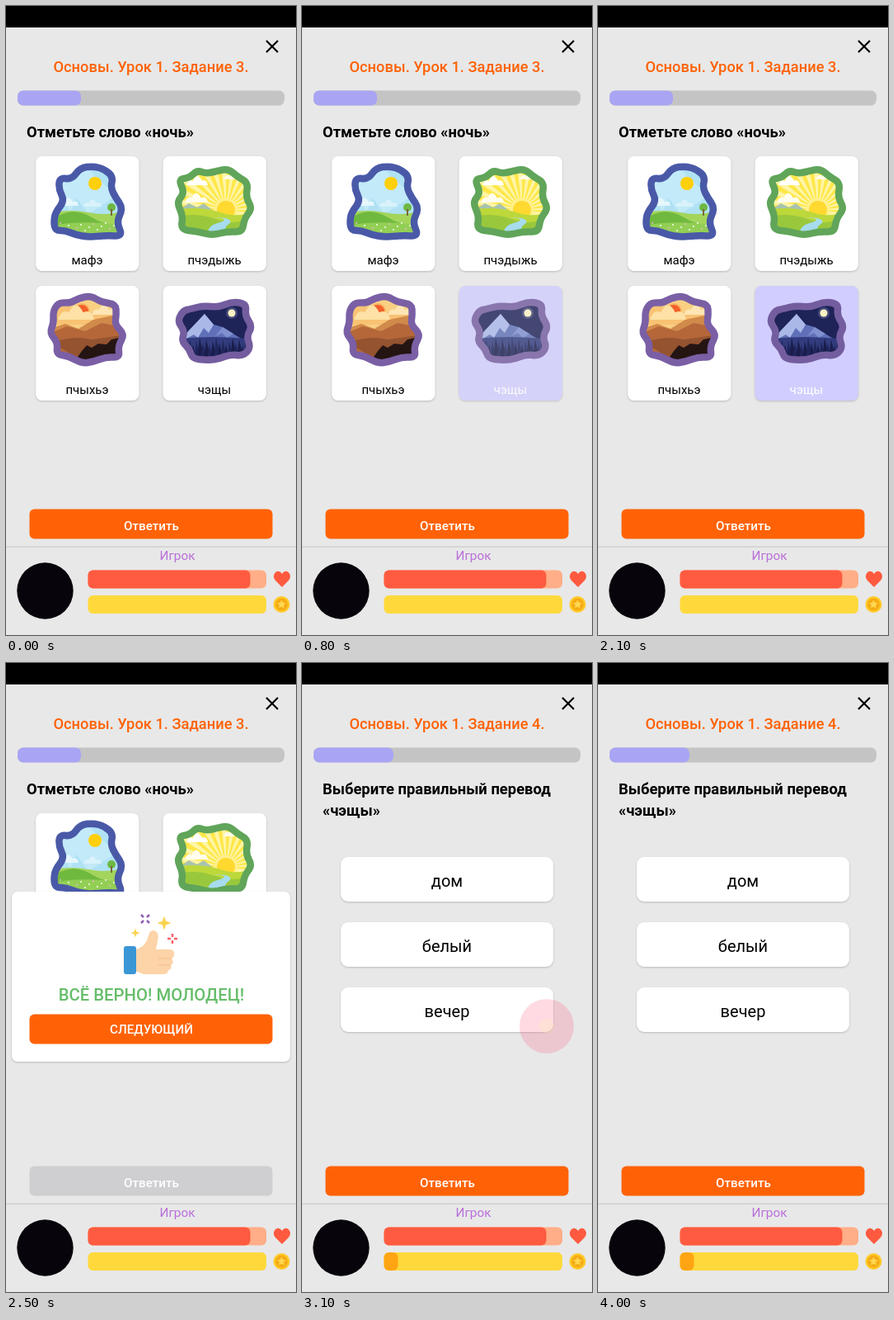
Write an HTML page that moves like this. It is 352x762 px and loops after 4100 ms.

```html
<!DOCTYPE html>
<html lang="ru">
<head>
<meta charset="utf-8">
<style>
html, body { margin: 0; width: 100%; height: 100%; overflow: hidden; background: #e8e8e8; }
svg { display: block; }
text { font-family: Roboto, "Noto Sans", sans-serif; text-anchor: middle; }
.bold { font-weight: 700; text-anchor: start; }
.medium { font-weight: 500; }
.raised { filter: drop-shadow(0 1px 1px #0003); }
</style>
</head>
<body>
<svg id="stage" width="352" height="762" viewBox="0 0 352 762"></svg>
<script>
const ORANGE = '#ff6206', LAVENDER = '#d1ceff', LOOP = 4100;

const rect = (x, y, w, h, r, fill, more = '') =>
  `<rect x="${x}" y="${y}" width="${w}" height="${h}" rx="${r}" fill="${fill}" ${more}/>`;
const circle = (x, y, r, fill, more = '') =>
  `<circle cx="${x}" cy="${y}" r="${r}" fill="${fill}" ${more}/>`;
const path = (d, fill, more = '') => `<path d="${d}" fill="${fill}" ${more}/>`;
const text = (x, y, size, str, fill = '#000', more = '') =>
  `<text x="${x}" y="${y}" font-size="${size}" fill="${fill}" ${more}>${str}</text>`;
const repeat = (n, make) => Array.from({ length: n }, (_, i) => make(i)).join('');

// Closed smooth outline through the midpoints of the given corners
function blob(corners) {
  const p = corners.split(' ').map(s => s.split(',').map(Number));
  const mid = i => {
    const a = p[i % p.length], b = p[(i + 1) % p.length];
    return `${(a[0] + b[0]) / 2} ${(a[1] + b[1]) / 2}`;
  };
  return `M${mid(0)}` + repeat(p.length, i => `Q${p[(i + 1) % p.length].join(' ')} ${mid(i + 1)}`) + 'Z';
}

function star(x, y, r, points, inner, fill) {
  const corner = i => {
    const a = i * Math.PI / points - Math.PI / 2, d = i % 2 ? r * inner : r;
    return `${i ? 'L' : 'M'}${x + d * Math.cos(a)} ${y + d * Math.sin(a)}`;
  };
  return path(repeat(points * 2, corner) + 'Z', fill);
}

const cloud = (x, y, s, fill) =>
  path(`M${x} ${y}q${s * .1} ${-s * .3} ${s * .3} ${-s * .2}q${s * .2} ${-s * .4} ${s * .4} 0q${s * .25} ${-s * .1} ${s * .3} ${s * .2}Z`, fill);

const dayScene = rect(52, 190, 96, 95, 0, '#b0e2f5')
  + path('M60 215L100 194L78 250ZM98 196L134 230L100 252L84 230Z', '#c2eaf8')
  + circle(108, 215, 8, '#ffcf0a')
  + cloud(64, 242, 24, '#e6f6fc') + cloud(94, 243, 22, '#d9f2fb')
  + path('M52 252Q75 245 100 250T148 247V285H52Z', '#a3d55d')
  + circle(128, 244, 5, '#6fb843') + rect(127, 246, 2, 8, 0, '#7b6a3a')
  + path('M52 262Q78 240 104 256T148 258V285H52Z', '#70b93f')
  + path('M52 267Q90 258 148 266V285H52Z', '#93cf55')
  + repeat(15, i => circle(66 + i * 5, 263 + i * 7 % 11, .9, i % 4 ? '#fff' : '#f4b6d0'));

const dawnScene = rect(205, 192, 98, 92, 0, '#fff5a6')
  + repeat(15, i => {
    const a = Math.PI + i * .225, b = a + .11;
    const end = v => `${267 + 75 * Math.cos(v)} ${247 + 75 * Math.sin(v)}`;
    return path(`M267 247L${end(a)}L${end(b)}Z`, '#ffe748');
  })
  + cloud(219, 217, 26, '#fff') + cloud(264, 210, 24, '#fdfbe4') + cloud(217, 238, 28, '#fffdee')
  + circle(267, 247, 14, '#fff08c') + circle(267, 247, 11, '#ffd92f')
  + path('M205 250L222 239L232 244L240 239L254 250Z', '#a8c3ae')
  + path('M205 247Q235 242 260 250T303 247V284H205Z', '#bdd83a')
  + path('M205 256Q230 249 254 258T303 256V284H205Z', '#99c83c')
  + path('M248 256Q274 257 260 262Q240 267 248 278H268Q262 269 272 263Q276 256 248 256Z', '#a6dcee');

const eveningScene = rect(50, 346, 97, 92, 0, '#f9d083')
  + path('M50 366Q76 360 92 368T147 364V386H50Z', '#f8c373')
  + circle(92, 370, 10, '#fba04b', 'opacity=".6"') + circle(92, 370, 8, '#f2622c')
  + cloud(104, 374, 30, '#fde6b4') + cloud(63, 380, 44, '#fde1a6')
  + path('M50 392L72 385L88 391L106 380L124 376L147 372V438H50Z', '#d08a4b')
  + path('M50 398L74 388L96 394L116 384L147 390V438H50Z', '#b5673a')
  + path('M50 410Q80 398 104 404L147 398V438H50Z', '#95532f')
  + path('M78 438L92 418L98 411L104 414L112 409L122 410L128 404L147 400V438Z', '#241513')
  + path('M50 414Q72 408 92 438H50Z', '#b5673a');

const nightScene = rect(205, 354, 98, 82, 0, '#1e2358')
  + circle(274, 372, 7, '#6b6f97', 'opacity=".5"') + circle(274, 372, 4.5, '#fdf4c4')
  + path('M205 412L228 388L241 373L252 386L263 389L300 412V436H205Z', '#5f70b8')
  + path('M241 373L222 393L210 408L228 398L233 402L240 390L246 396L252 386Z', '#aab8e8')
  + path('M263 389L254 400L262 396L268 402L276 397Z', '#7f8fd0')
  + path('M205 404Q250 398 303 404V436H205Z', '#323c7e')
  + repeat(25, i => path(`M${203 + i * 4} 436l4 ${-26 - i * 7 % 5 * 2}l7 30Z`, i % 2 ? '#191d4b' : '#20265c'));

const cards = [
  { x: 36, y: 182, word: 'мафэ', frame: '#4a59a7', scene: dayScene,
    edge: '106,194 120,198 130,207 127,220 133,232 142,245 134,262 142,279 122,278 100,280 84,277 72,272 60,272 58,262 60,250 71,236 64,222 65,208 80,210 90,196' },
  { x: 190.5, y: 182, word: 'пчэдыжь', frame: '#60a55a', scene: dawnScene,
    edge: '232,199 243,203 256,200 270,197 281,207 294,214 291,232 299,245 289,258 287,274 268,273 250,278 232,273 212,271 215,254 207,238 217,226 209,210 223,208' },
  { x: 36, y: 339, word: 'пчыхьэ', frame: '#7a5fa5', scene: eveningScene,
    edge: '88,354 103,351 116,359 133,361 134,374 132,386 144,398 136,412 138,426 122,425 106,431 92,433 76,424 61,422 63,408 53,396 58,384 57,370 64,359 78,360' },
  { x: 190.5, y: 339, word: 'чэщы', frame: '#745d9f', scene: nightScene,
    edge: '224,367 240,363 258,365 275,358 292,361 290,375 299,388 292,400 297,414 288,424 272,422 257,428 242,429 226,427 223,416 213,406 217,394 208,382 215,369' },
];

const card = ({ x, y, word, frame, scene, edge }, i) => {
  const d = blob(edge);
  return `<g id="card${i}"><clipPath id="clip${i}">${path(d, '#000')}</clipPath>`
    + rect(x, y, 125.5, 139, 8, '#fff', 'class="raised"')
    + `<g clip-path="url(#clip${i})">${scene}</g>`
    + path(d, 'none', `stroke="${frame}" stroke-width="8.5"`)
    + text(x + 62.5, y + 131, 15, word) + '</g>';
};

const option = (word, i) =>
  rect(47, 235 + i * 79, 258, 54, 9, '#fff', 'class="raised"') + text(176, 270.5 + i * 79, 20, word);

const thumb = path('M157 347Q167 345 171 336L174 327Q177 322 182 325Q186 328 184 337L182 347H199Q205 348 204 353Q204 357 201 358Q205 363 200 366Q202 371 197 372Q197 377 190 377H167L157 373Z', '#fdd3a8')
  + path('M184 358H201M185 366H200', 'none', 'stroke="#f4bd8c"')
  + rect(143, 343, 15, 34, 3, '#3a96d5')
  + star(192, 315, 8.5, 4, .36, '#f8d34c') + star(157, 327, 5.5, 4, .36, '#f8d34c')
  + path('M164 305l3 3m4 4l3 3M174 305l-3 3m-4 4l-3 3', 'none', 'stroke="#8f5fb5" stroke-width="2.5"')
  + path('M202 328v4m0 4v4M196 334h4m4 0h4', 'none', 'stroke="#f8616b" stroke-width="2.5"');

document.getElementById('stage').innerHTML =
  rect(0, 0, 352, 762, 0, '#e8e8e8') + rect(0, 0, 352, 26, 0, '#000')
  + path('M316 42l14 14m0-14l-14 14', 'none', 'stroke="#000" stroke-width="2.2"')
  + text(176, 79.5, 18.3, '', ORANGE, 'id="title" class="medium"')
  + rect(14, 102.5, 324, 18, 7, '#c4c4c4') + rect(14, 102.5, 77, 18, 7, '#a9a5f4', 'id="progress"')
  + `<g id="choose">${text(25, 159, 18.4, 'Отметьте слово «ночь»', '#000', 'class="bold"')}${cards.map(card).join('')}</g>`
  + `<g id="translate">${text(25, 159, 18.4, 'Выберите правильный перевод', '#000', 'class="bold"')}`
  + text(25, 185, 18.4, '«чэщы»', '#000', 'class="bold"') + ['дом', 'белый', 'вечер'].map(option).join('') + '</g>'
  + rect(28.5, 609.5, 295, 36, 6, ORANGE, 'id="answer"') + text(176.5, 635, 15.2, 'Ответить', '#fff', 'class="medium"')
  + rect(0, 654.5, 352, 1.5, 0, '#d0d0d2')
  + text(208, 671, 15.3, 'Игрок', '#b86fd9')
  + circle(47.5, 708.5, 34.2, '#08040c')
  + rect(99.5, 683.5, 216.5, 22, 6, '#ffae87') + rect(99.5, 683.5, 197, 22, 6, '#ff5b40')
  + rect(99.5, 714, 216.5, 22, 6, '#ffd93b') + rect(99.5, 714, 17, 22, 6, '#ffa513', 'id="coins"')
  + path('M335 704L327 696C321 689 330 680 335 688C340 680 349 689 343 696Z', '#ff5a3f')
  + circle(334.5, 725, 10, '#ffc928') + circle(334.5, 725, 7.5, '#f5ac14') + star(334.5, 725, 5.5, 5, .5, '#ffd750')
  + `<g id="popup">${rect(7, 277, 338, 206, 7, '#fff', 'class="raised"')}${thumb}`
  + text(176.5, 409, 20.3, 'ВСЁ ВЕРНО! МОЛОДЕЦ!', '#66bd6a', 'class="medium"')
  + rect(28.5, 425.5, 295, 36, 6, ORANGE, 'id="next"')
  + text(176.5, 449, 15.2, 'СЛЕДУЮЩИЙ', '#fff', 'class="medium"') + '</g>'
  + `<g id="touch">${circle(0, 0, 13, 'none', 'id="ring" stroke="#e0527d" stroke-width="1.3"')}`
  + `<g id="ripple">${circle(0, 0, 33, '#ff5078', 'id="disc" opacity=".38"')}${circle(0, 0, 9, '#ffd0a0', 'opacity=".6"')}</g></g>`;

const $ = id => document.getElementById(id);
const set = (id, name, value) => $(id).setAttribute(name, value);
const show = (id, opacity) => set(id, 'opacity', Number(opacity));
const ramp = (t, from, to) => Math.min(1, Math.max(0, (t - from) / (to - from)));

// Quick fade on press, slower eased recovery on release
const pressed = (t, start, depth) =>
  1 - depth * ramp(t, start, start + 100) * (1 - ramp(t, start + 100, start + 400)) ** 2;

const taps = [
  { start: 2900, x: 297, y: 440, length: 300 },
  { start: 3600, x: 266.5, y: 104.5, length: 400 },
];

function drawTouch(t) {
  const tap = taps.find(({ start, length }) => t >= start && t < start + length);
  show('touch', !!tap);
  if (!tap) return;
  const age = t - tap.start;
  set('touch', 'transform', `translate(${tap.x} ${tap.y})`);
  show('ring', age < 70);
  show('ripple', age < 70 ? 0 : 1 - ramp(age, 120, tap.length));
  set('disc', 'r', 13 + 20 * ramp(age, 30, 95));
}

function draw() {
  const t = performance.now() % LOOP;
  const second = t >= 3080, selected = t >= 650, done = t >= 2350 && !second;

  $('title').textContent = `Основы. Урок 1. Задание ${second ? 4 : 3}.`;
  set('progress', 'width', second ? 97 : 77);
  show('coins', second);
  show('choose', !second);
  show('translate', second);

  show('card3', pressed(t, 600, .42));
  $('card3').querySelector('.raised').setAttribute('fill', selected ? LAVENDER : '#fff');
  $('card3').querySelector('text').setAttribute('fill', selected ? '#fff' : '#000');

  set('answer', 'fill', done ? '#cfcfd1' : ORANGE);
  show('answer', done ? 1 : pressed(t, 2150, .6));
  show('popup', second ? 0 : ramp(t, 2300, 2480));
  show('next', pressed(t, 2900, .13));
  drawTouch(t);
  requestAnimationFrame(draw);
}
draw();
</script>
</body>
</html>
```
